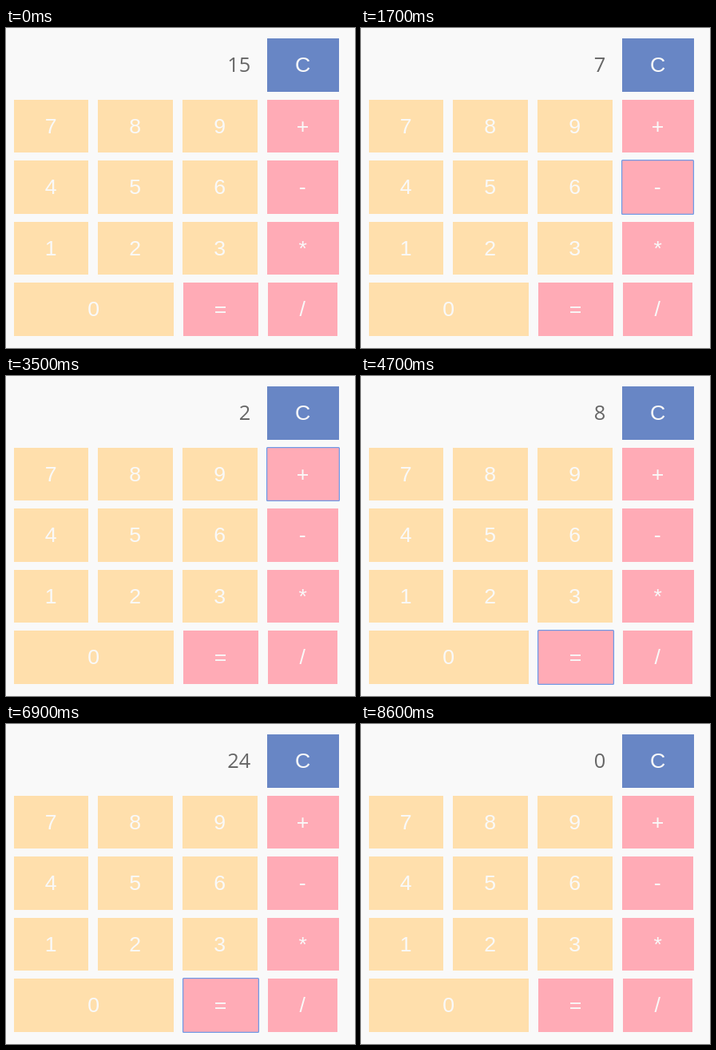
Write an HTML page that moves like this. It is 437 px wide and 401 px high and loops after 8700 ms.

```html
<!DOCTYPE html>
<html lang="en">
<head>
<meta charset="utf-8">
<title>Calculator</title>
<style>
  html, body { margin: 0; width: 100%; height: 100%; overflow: hidden; background: #f9f9f9; }
  svg { display: block; width: 437px; height: 401px; }
  .key text { font: 26.667px "Liberation Sans", Arial, sans-serif; fill: #f9f9f9; text-anchor: middle; }
  .ring { fill: none; stroke: #6f9ae6; stroke-width: 1.3; visibility: hidden; }
  .focus .ring { visibility: visible; }
  #display { font: 25.4px "Open Sans", "Noto Sans", sans-serif; fill: #666; text-anchor: end; }
</style>
</head>
<body>
<svg id="stage" viewBox="0 0 437 401">
  <text id="display" x="306.3" y="55">15</text>
</svg>
<script>
const LOOP = 8700;
const SAND = '#ffdfac', PINK = '#ffabb6', BLUE = '#6886c5';

// label, left, top, right, bottom, colour
const KEYS = [
  ['C', 327, 13, 417, 80, BLUE],
  ['7', 10, 90, 103, 156, SAND], ['8', 115, 90, 209, 156, SAND],
  ['9', 221, 90, 315, 156, SAND], ['+', 327, 90, 417, 156, PINK],
  ['4', 10, 166, 103, 233, SAND], ['5', 115, 166, 209, 233, SAND],
  ['6', 221, 166, 315, 233, SAND], ['-', 327, 166, 416, 233, PINK],
  ['1', 10, 243, 103, 309, SAND], ['2', 115, 243, 209, 309, SAND],
  ['3', 221, 243, 315, 309, SAND], ['*', 327, 243, 417, 309, PINK],
  ['0', 10, 319, 210, 386, SAND], ['=', 222, 319, 316, 386, PINK],
  ['/', 328, 319, 415, 386, PINK]
];

// start in ms, display, focused key
const STEPS = [
  [0, '15', ''],
  [1000, '15', '='], [1100, '7', '7'],
  [1700, '7', '-'],
  [2200, '7', '5'], [2300, '5', '5'],
  [2700, '5', '='], [2800, '2', '='],
  [3500, '2', '+'],
  [4100, '6', '6'],
  [4600, '6', '='], [4700, '8', '='],
  [5800, '8', '*'],
  [6400, '3', '3'],
  [6800, '3', '='], [6900, '24', '='],
  [7600, '0', 'C'],
  [8600, '0', '']
];

const stage = document.getElementById('stage');
const display = document.getElementById('display');
const keys = {};

function add(parent, tag, attrs) {
  const el = document.createElementNS('http://www.w3.org/2000/svg', tag);
  for (const name in attrs) el.setAttribute(name, attrs[name]);
  return parent.appendChild(el);
}

for (const [label, left, top, right, bottom, fill] of KEYS) {
  const width = right - left, height = bottom - top;
  const key = add(stage, 'g', { class: 'key' });
  add(key, 'rect', { x: left, y: top, width, height, fill });
  add(key, 'rect', {
    class: 'ring', x: left - 0.4, y: top - 0.4,
    width: width + 0.8, height: height + 0.8, rx: 1
  });
  add(key, 'text', { x: (left + right) / 2 - 0.4, y: Math.round((top + bottom) / 2 + 8.9) })
    .textContent = label;
  keys[label] = key;
}

let shown = null;

function draw(now) {
  const time = now % LOOP;
  const step = STEPS.filter(([start]) => start <= time).pop();
  if (step !== shown) {
    shown = step;
    display.textContent = step[1];
    for (const label in keys) keys[label].classList.toggle('focus', label === step[2]);
  }
}

const begin = performance.now();
function tick() {
  draw(performance.now() - begin);
  requestAnimationFrame(tick);
}
tick();
</script>
</body>
</html>
```
